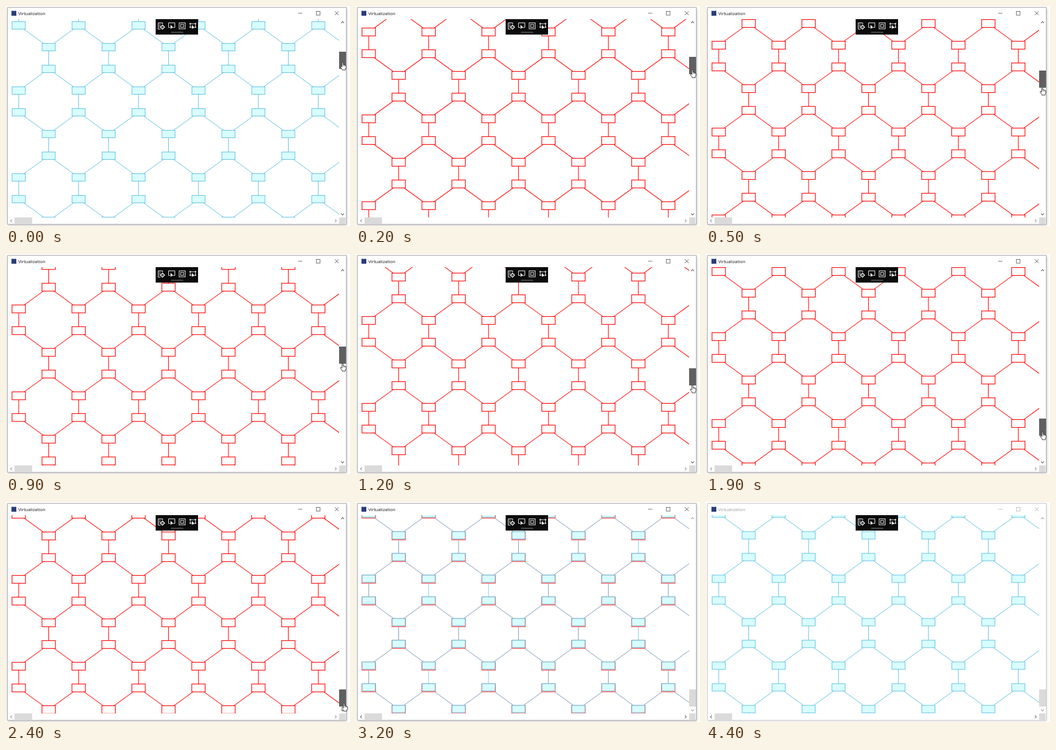
An HTML page with a canvas that plays this animation: 600x385 px, repeating every 4500 ms.

```html
<!DOCTYPE html>
<html lang="en">
<head>
<meta charset="utf-8">
<title>Virtualization</title>
<style>
  html, body { margin: 0; width: 100%; height: 100%; overflow: hidden; background: #fff; }
  canvas { display: block; }
</style>
</head>
<body>
<canvas id="stage" width="600" height="385"></canvas>
<script>
const ctx = document.getElementById('stage').getContext('2d');
const LOOP = 4500, STEP = 52.25, ROW = 38, PERIOD = 4 * ROW;
const CYAN = '#5fc0e2', RED = '#ff0808';

// Scroll distance, its speed, and the pointer's place on the thumb at key times
const times = [0, 500, 900, 1500, 1900, 2400];
const scrolls = [0, 383.4, 963.9, 1838.4, 2435.4, 2900.6];
const speeds = [0.35, 1.2, 1.46, 1.48, 1.3, 0.4];
const grips = [18, 29, 29, 29, 23, 24];
const pointerXs = [587, 586.5, 587, 586.5, 587, 589.5];

function motionAt(t) {
  t = Math.min(t, 2400);
  let i = 0;
  while (i < times.length - 2 && t >= times[i + 1]) i++;
  const span = times[i + 1] - times[i], u = (t - times[i]) / span;
  const mix = list => list[i] + (list[i + 1] - list[i]) * u;
  const s = u * u * (3 - 2 * u);
  const scroll = scrolls[i] + (scrolls[i + 1] - scrolls[i]) * s
    + span * u * (1 - u) * (speeds[i] * (1 - u) - speeds[i + 1] * u);
  return { scroll, grip: mix(grips), x: mix(pointerXs) };
}

function rect(x, y, w, h, fill) {
  ctx.fillStyle = fill;
  ctx.fillRect(x, y, w, h);
}

function line(points, color, width = 1, fill) {
  ctx.beginPath();
  points.forEach(([x, y], i) => i ? ctx.lineTo(x, y) : ctx.moveTo(x, y));
  if (fill) {
    ctx.closePath();
    ctx.fillStyle = fill;
    ctx.fill();
  }
  ctx.strokeStyle = color;
  ctx.lineWidth = width;
  ctx.stroke();
}

function box(x, y, w, h, color, width = 1) {
  ctx.strokeStyle = color;
  ctx.lineWidth = width;
  ctx.strokeRect(x, y, w, h);
}

function eachNode(offset, draw) {
  const start = (offset % PERIOD + PERIOD) % PERIOD;
  for (let col = 0; col < 12; col++)
    for (let y = start - 2 * PERIOD; y < 600; y += PERIOD)
      draw(22.2 + col * STEP, y + (col % 2 ? ROW : -ROW), col);
}

function drawEdges(offset, color, width, pale) {
  eachNode(offset, (x, y, col) => {
    const upright = pale && [2, 4, 9].includes(col) ? '#86cbe6' : color;
    line([[x, y], [x, y + ROW]], upright, width);
    line([[x, y], [x + STEP, y - ROW]], color, width);
    line([[x, y + ROW], [x + STEP, y + 2 * ROW]], color, width);
  });
}

function drawBoxes(offset, stroke, fill, lineWidth, w, h) {
  eachNode(offset, (x, top) => {
    for (const y of [top, top + ROW]) {
      rect(x - w / 2, y - h / 2, w, h, fill);
      box(x - w / 2, y - h / 2, w, h, stroke, lineWidth);
    }
  });
}

function drawDiagram(t, scroll) {
  const offset = 34 - scroll;
  ctx.save();
  ctx.beginPath();
  ctx.rect(6, 23, 575, 347);
  ctx.clip();
  if (t >= 100 && t < 3200) {
    drawEdges(offset, RED, 1.1);
    drawBoxes(offset, RED, '#fff', 1.2, 23.4, 13.8);
  } else {
    const blending = t >= 3200 && t < 3700;
    const settled = t ? offset - 1 : offset;
    drawEdges(settled, blending ? '#7d95b5' : CYAN, 1, blending);
    if (blending) drawBoxes(offset, '#ff6a6a', '#fff', 1.5, 23.4, 13.8);
    drawBoxes(settled, blending ? '#5aa9cc' : CYAN, '#d8fdff', 1, 23, 13);
    if (blending) eachNode(offset, (x, top) => {
      for (const y of [top, top + ROW])
        line([[x - 11.8, y], [x - 11.8, y + 6.5], [x + 11.8, y + 6.5], [x + 11.8, y]], '#f47c80', 1);
    });
  }
  ctx.restore();
}

function chevron(x, y, dx, dy, color) {
  line([[x - 2.5 * dy - 1.3 * dx, y - 2.5 * dx - 1.3 * dy], [x + 1.3 * dx, y + 1.3 * dy],
        [x + 2.5 * dy - 1.3 * dx, y + 2.5 * dx - 1.3 * dy]], color, 1.1);
}

function drawScrollbars(t, thumbY) {
  const dragging = t < 2700;
  const vertical = dragging ? '#505050' : '#999';
  const horizontal = dragging ? '#a0a0a0' : '#777';
  chevron(587, 28.5, 0, -1, vertical);
  chevron(587, 364.5, 0, 1, vertical);
  chevron(9, 376, -1, 0, horizontal);
  chevron(575, 376, 1, 0, horizontal);
  rect(15, 370, 30.5, 12, '#dadada');
  rect(581, 370, 11, 11.5, '#dadada');
  rect(581, thumbY, 12, 30, dragging ? '#606060' : t < 2900 ? '#a6a6a6' : '#dadada');
}

function drawWindow(active) {
  ctx.save();
  ctx.shadowColor = active ? 'rgba(0,0,0,.35)' : 'rgba(0,0,0,.2)';
  ctx.shadowBlur = 4;
  ctx.shadowOffsetY = 1;
  rect(2.5, 2.5, 591, 379.5, '#fff');
  ctx.restore();
  box(2.5, 2.5, 591, 379.5, active ? '#a8a8a8' : '#c8c8c8');

  const ink = active ? '#4a4a4a' : '#b0b0b0';
  rect(9.5, 8.5, 8.5, 8.5, '#2b3c78');
  ctx.fillStyle = active ? '#111' : '#999';
  ctx.font = '7.7px "Open Sans", "Noto Sans", sans-serif';
  ctx.fillText('Virtualization', 21.5, 15.8);
  line([[509.5, 12.7], [517, 12.7]], ink, 0.8);
  box(541.3, 9.5, 6.5, 6.5, ink, 0.8);
  line([[573.5, 9.3], [580.3, 16.1]], ink, 0.9);
  line([[580.3, 9.3], [573.5, 16.1]], ink, 0.9);
}

function arrow(x, y) {
  line([[x, y], [x, y + 8], [x + 2, y + 6.2], [x + 5.6, y + 5.8]], '#0b0b0b', 0.5, '#fff');
}

function drawToolbar() {
  const white = '#f0f0f0';
  rect(261, 23, 74, 27, '#0b0b0b');
  rect(288, 45, 21, 2, '#484848');

  line([[273.2, 32], [273.2, 29.5], [265.5, 29.5], [265.5, 40.5], [269.5, 40.5]], white);
  for (const y of [32, 34.5, 37]) line([[267, y], [269.5, y]], white, 0.9);
  line([[273, 33.5], [276.5, 37], [273, 40.5], [269.5, 37]], white, 1.5, '#0b0b0b');
  rect(272.4, 36.4, 1.2, 1.2, white);

  line([[286, 37.5], [283.5, 37.5], [283.5, 29.5], [294.5, 29.5], [294.5, 37.5], [292, 37.5]], white);
  arrow(286.8, 32.5);

  box(302, 29.5, 10.5, 10.5, white);
  box(304.7, 32.2, 5.1, 5.1, white);

  line([[324, 37], [321.3, 37], [321.3, 31], [330.5, 31], [330.5, 37], [329, 37]], white, 0.9);
  for (const x of [320.2, 329.4])
    for (const y of [29.7, 36]) rect(x, y, 2.2, 2.2, white);
  arrow(324, 32.7);
}

function drawHand(x, y) {
  ctx.save();
  ctx.translate(x, y);
  ctx.lineJoin = 'round';
  line([[-1, 0.6], [0, 0], [1, 0.6], [1.1, 4.6], [2.8, 4.7], [3.2, 5.3], [4.7, 5.4], [5, 6],
        [6, 6.3], [6.4, 7.2], [6.2, 10], [5, 12.2], [4.9, 14], [-0.6, 14], [-0.8, 12.5],
        [-3.6, 9], [-3.6, 7.6], [-2.4, 7.4], [-1, 8.6]], '#222', 0.9, '#fff');
  for (const i of [1.1, 2.9, 4.7]) line([[i, 5], [i, 7.6]], '#444', 0.6);
  ctx.restore();
}

function drawPointer(t, x, y) {
  if (t >= 2900) return;
  if (t >= 2800) drawHand(591, 374);
  else if (t >= 2700) drawHand(591, 365);
  else if (t >= 2500) drawHand(591, 358);
  else drawHand(x, y);
}

function render(now) {
  const t = Math.floor(now % LOOP / 100) * 100;
  const { scroll, grip, x } = motionAt(t);
  const thumbY = Math.round(80 + scroll / 11.7);
  rect(0, 0, 600, 385, '#fff');
  drawWindow(t < 4400);
  drawDiagram(t, scroll);
  drawScrollbars(t, thumbY);
  drawToolbar();
  drawPointer(t, x, thumbY + grip);
}

const begin = performance.now();
function tick() {
  render(performance.now() - begin);
  requestAnimationFrame(tick);
}
tick();
</script>
</body>
</html>
```
